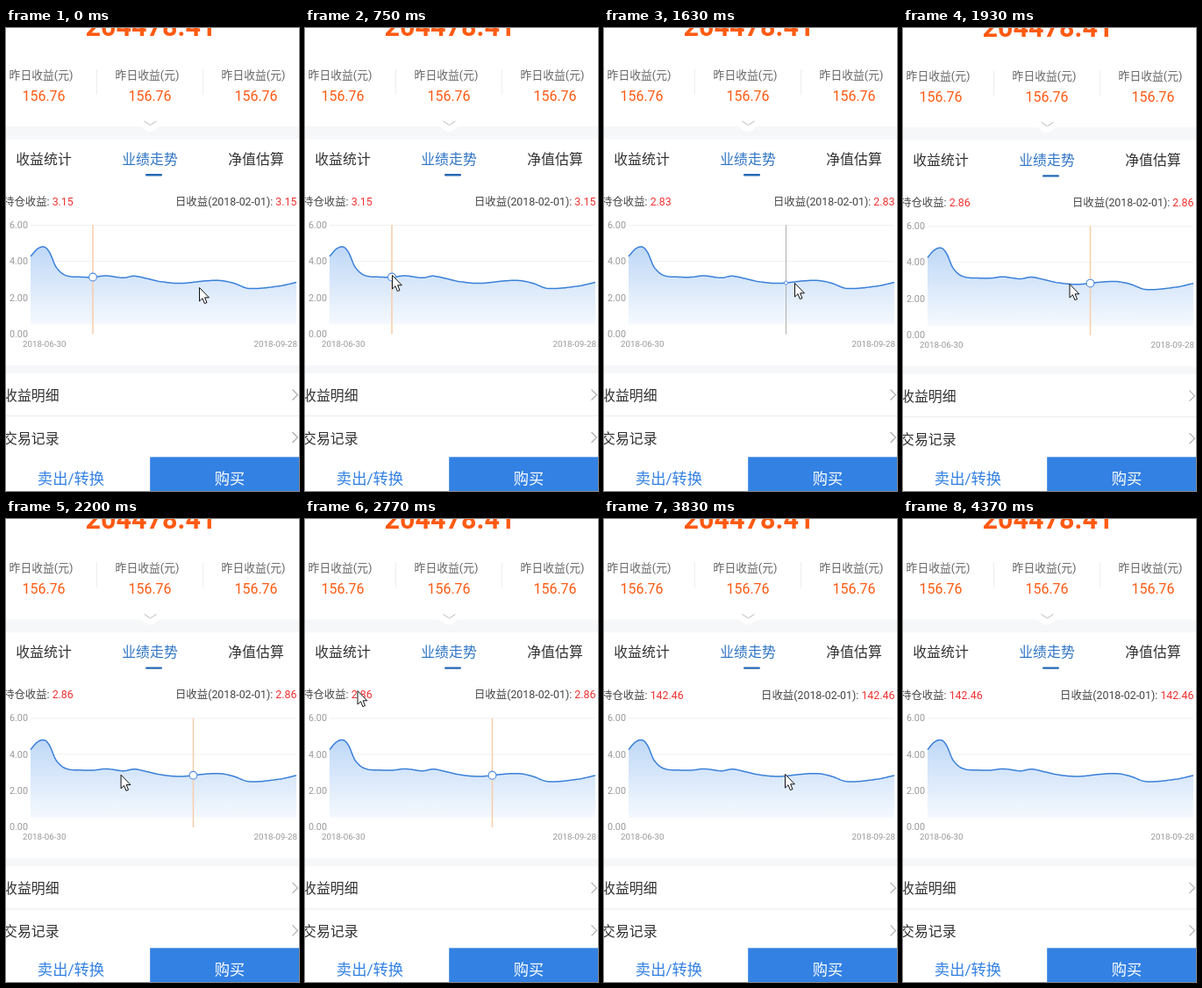
Write an HTML page that moves like this. It is 334 px wide and 527 px high and loops after 5.21 s.

```html
<!DOCTYPE html>
<html lang="zh-CN">
<head>
<meta charset="utf-8">
<title>Fund chart</title>
<style>
html, body { margin: 0; width: 100%; height: 100%; overflow: hidden; background: #fff; }
svg { display: block; width: 334px; height: 527px; font-family: Roboto, "Noto Sans CJK SC", "Noto Sans CJK", sans-serif; }
</style>
</head>
<body>
<svg id="stage" viewBox="0 0 334 527" xmlns="http://www.w3.org/2000/svg">
  <defs>
    <linearGradient id="fade" x1="0" y1="0" x2="0" y2="1">
      <stop offset="0" stop-color="#bfd8f7"/>
      <stop offset="1" stop-color="#f5f9fe"/>
    </linearGradient>
  </defs>
  <rect width="334" height="527" fill="#fff"/>
  <g id="page">
    <g id="static"></g>
    <path id="area" fill="url(#fade)"/>
    <path id="curve" fill="none" stroke="#3a80d9" stroke-width="1.5" stroke-linejoin="round"/>
    <g id="marker">
      <line id="rule" y1="224" y2="348.5"/>
      <circle id="dot" fill="#fff" stroke="#4a8be0"/>
    </g>
    <g id="detail" font-size="12.4" fill="#444">
      <text x="-3" y="202">持仓收益: <tspan class="val" fill="#f03030"></tspan></text>
      <text x="331.5" y="202" text-anchor="end">日收益(2018-02-01): <tspan class="val" fill="#f03030"></tspan></text>
    </g>
  </g>
  <g id="buttons" font-size="17.3" text-anchor="middle">
    <rect y="488" width="165" height="39" fill="#fff"/>
    <rect x="164.2" y="488.3" width="170" height="39" fill="#3381e3"/>
    <text x="74" y="518.5" fill="#3381e3">卖出/转换</text>
    <text x="255" y="518.5" fill="#fff">购买</text>
  </g>
  <path id="cursor" d="M.5 .5V16L4 12.7 6.4 18.6 9 17.5 6.6 11.8H11.4Z" fill="#fff" stroke="#111" stroke-linejoin="round"/>
</svg>
<script>
const LOOP = 5210;
const $ = id => document.getElementById(id);
const set = (el, attrs) => { for (const k in attrs) el.setAttribute(k, attrs[k]); };

const text = (x, y, size, fill, str, extra = '') =>
  `<text x="${x}" y="${y}" font-size="${size}" fill="${fill}" ${extra}>${str}</text>`;
const rect = (x, y, w, h, fill, rx = 0) =>
  `<rect x="${x}" y="${y}" width="${w}" height="${h}" fill="${fill}" rx="${rx}"/>`;
const stroke = (d, color, w = 1) =>
  `<path d="${d}" fill="none" stroke="${color}" stroke-width="${w}"/>`;
const MID = 'text-anchor="middle"', END = 'text-anchor="end"';

function buildPage() {
  let s = text(165, 9, 30.5, '#ff5a12', '204478.41', MID + ' font-weight="700"');
  s += rect(0, 112, 334, 14.5, '#f6f7f9') + rect(0, 384, 334, 9, '#f6f7f9');
  s += '<path d="M151 112C157 112 158 118 164 118S171 112 177 112Z" fill="#fff"/>';
  s += stroke('M157.5 106L164.5 110.5 171.5 106', '#bbb');
  ['收益统计', '业绩走势', '净值估算'].forEach((tab, i) => {
    const x = 43 + 121 * i;
    s += text(x - 39.4, 58, 12.8, '#666', '昨日收益(元)');
    s += text(x, 83, 16, '#ff5a12', '156.76', MID);
    s += text(x, 155, 15.9, i === 1 ? '#2e74c4' : '#333', tab, MID);
    if (i) s += rect(121 * i - 18, 47, 1, 29, '#eee');
  });
  s += rect(159, 166, 19, 2.4, '#2468b4', 1.2);
  for (let i = 0; i < 4; i++)
    s += text(25, 228 + 41.3 * i, 10.8, '#999', (6 - 2 * i).toFixed(2), END);
  s += rect(28, 224, 303, 1, '#f1f1f1') + rect(28, 265, 303, 1, '#f1f1f1');
  s += text(19, 363, 9.8, '#999', '2018-06-30') + text(332, 363, 9.8, '#999', '2018-09-28', END);
  ['收益明细', '交易记录'].forEach((row, i) => {
    const y = 418 + 48.5 * i;
    s += text(-3, y + 6, 15.9, '#333', row);
    s += stroke(`M326.5 ${y - 6.5}L332.5 ${y - .5} 326.5 ${y + 5.5}`, '#aaa', 1.1);
  });
  s += rect(0, 441, 334, 1, '#ececec');
  $('static').innerHTML = s;
}

// Turning points of the chart, joined by a smooth cubic
const KNOTS = [
  [28, 260], [36, 251.3], [44, 249.3], [50, 256], [57, 272], [68, 281.5], [88, 283.5],
  [100, 283.5], [114, 282], [134, 284.3], [146, 282.3], [160, 285], [176, 288.6],
  [199, 290.6], [227, 287.9], [244, 287.4], [259, 290.3], [277, 296.4], [311, 293.8], [331, 289.5]
];
const last = KNOTS.length - 1;

function slope(i) {
  const [xa, ya] = KNOTS[Math.max(i - 1, 0)], [xb, yb] = KNOTS[Math.min(i + 1, last)];
  return (yb - ya) / (xb - xa);
}

function curveY(x) {
  let i = 0;
  while (i < last - 1 && KNOTS[i + 1][0] < x) i++;
  const [x0, y0] = KNOTS[i], [x1, y1] = KNOTS[i + 1];
  const w = x1 - x0, u = (x - x0) / w, v = 1 - u;
  return v * v * (1 + 2 * u) * y0 + u * u * (1 + 2 * v) * y1
    + w * u * v * (v * slope(i) - u * slope(i + 1));
}

function buildChart() {
  let d = 'M';
  for (let x = 28; x <= 331; x += 1.5) d += `${x} ${curveY(x).toFixed(2)} `;
  set($('curve'), { d });
  set($('area'), { d: d + 'V337.5H28Z' });
}

// Moves: start, refresh interval, refreshes, ease-out power, destination
const POINTER = [
  [0, 150, 5, 2.7, 99, 281],
  [1030, 120, 5, 2.5, 217, 290],
  [1630, 150, 2, 1, 189.5, 291],
  [1930, 140, 3, 2.5, 97, 290],
  [2350, 135, 2, 1, 51, 194],
  [2620, 140, 2, 1, 68, 196],
  [3035, 135, 3, 2, 237, 316],
  [3440, 130, 3, 1, 206, 290],
  [3830, 130, 3, 1, 240, 455]
];
const MARKER = [[1030, 120, 5, 1, 207.5], [1630, 150, 2, 1, 213.5]];
const SCROLL = [[1630, 150, 1, 1, 1.2], [1950, 125, 2, 1, 2.4]];
const GRAB = 1150, DROP = 1780, HIDE = 3440, RESET = 3590, LEAVE = 4370;

function glide(moves, t, x, y = 0) {
  for (const [start, step, n, power, tx, ty = 0] of moves) {
    const k = Math.min(Math.max(Math.floor((t - start) / step), 0), n) / n;
    x += (tx - x) * (1 - (1 - k) ** power);
    y += (ty - y) * k * k * (3 - 2 * k);
  }
  return [x, y];
}

const shift = (id, x, y) => set($(id), { transform: `translate(${x} ${y})` });
const show = (id, on) => set($(id), { visibility: on ? 'visible' : 'hidden' });

function draw(t) {
  const [x] = glide(MARKER, t, 99);
  const y = curveY(x);
  const drag = t >= GRAB && t < DROP;
  const reset = t >= RESET;
  const value = reset ? '142.46' : ((348 - y) / 20.476).toFixed(2);

  shift('page', 0, glide(SCROLL, t, 0)[0]);
  shift('cursor', ...glide(POINTER, t, 220, 295));
  shift('detail', 0, reset ? 1 : 0);
  show('cursor', t < LEAVE);
  show('marker', t < HIDE);
  set($('rule'), { x1: x, x2: x, stroke: drag ? '#b0b0b0' : '#f7cdaa', 'stroke-width': drag ? 1 : 1.5 });
  set($('dot'), { cx: x, cy: y, r: drag ? 2 : 4.4, 'stroke-width': drag ? .9 : 1.1 });
  document.querySelectorAll('.val').forEach(el => { el.textContent = value; });
}

buildPage();
buildChart();
const start = performance.now();
function tick() {
  draw((performance.now() - start) % LOOP);
  requestAnimationFrame(tick);
}
tick();
</script>
</body>
</html>
```
